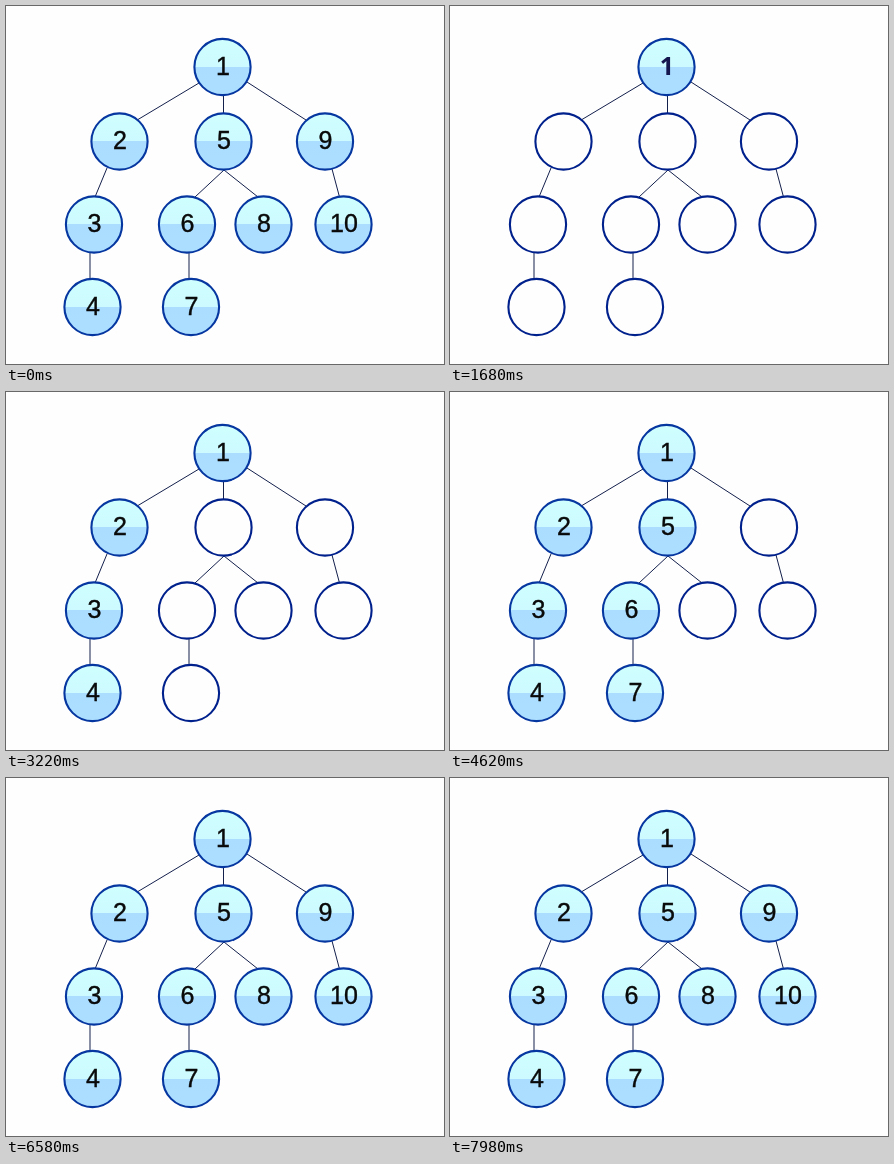
These frames come from a looping animation (438x358 px, 8 s). An HTML page:

```html
<!DOCTYPE html>
<html lang="en">
<head>
<meta charset="utf-8">
<title>Depth-first search order</title>
<style>
html, body { margin: 0; width: 100%; height: 100%; overflow: hidden; background: #fefefe; }
svg { display: block; width: 438px; height: 358px; }
circle { fill: #fefefe; stroke: #00208c; stroke-width: 2.1; }
text { font: 25px "Liberation Sans", Arial, sans-serif; text-anchor: middle; fill: #0a0a0a; stroke: #0a0a0a; stroke-width: .4; visibility: hidden; }
.on circle { fill: url(#glass); stroke: #0636a0; }
.on text { visibility: visible; }
.first text { font: bold 25px "Open Sans", sans-serif; fill: #16164e; stroke: none; }
path { fill: none; stroke: #14204c; stroke-width: 1; }
</style>
</head>
<body>
<svg viewBox="0 0 438 358">
  <defs>
    <linearGradient id="glass" x2="0" y2="1">
      <stop offset="0" stop-color="#d0ffff"/>
      <stop offset=".5" stop-color="#ccfaff"/>
      <stop offset=".5" stop-color="#aaddff"/>
      <stop offset="1" stop-color="#acdfff"/>
    </linearGradient>
  </defs>
  <path d="M193 77L132 113.500M217.500 89V108M241 76L300 114M101 162L89 191M84 246V274M189 191L218 164L252 191M183 246V274M326 163L333.500 191"/>
  <g id="tree"></g>
</svg>
<script>
const LOOP = 8000, TICK = 140, RESET = 1120, START = 1540, STEP = 480;
// node centres in visiting order
const centres = [
  [216.5, 61], [113.5, 135.5], [88, 218.5], [86.5, 301], [217.5, 135.5],
  [181, 218.5], [185, 301], [257.5, 218.5], [319, 135.5], [337.5, 218.5]
];
const tree = document.getElementById("tree");
tree.innerHTML = centres.map(([x, y], i) =>
  `<g><circle cx="${x}" cy="${y}" r="28.1"/><text x="${x + .5}" y="${y + 7.8}">${i + 1}</text></g>`).join("");
const nodes = [...tree.children];

function visitedAt(t) {
  if (t < RESET) return nodes.length;
  return Math.max(0, Math.floor((t - START) / STEP) + 1);
}

function draw(now) {
  const t = Math.floor(now % LOOP / TICK) * TICK;
  const visited = visitedAt(t);
  nodes.forEach((node, i) => node.classList.toggle("on", i < visited));
  nodes[0].classList.toggle("first", visited === 1);
  requestAnimationFrame(draw);
}
draw(performance.now());
</script>
</body>
</html>
```
